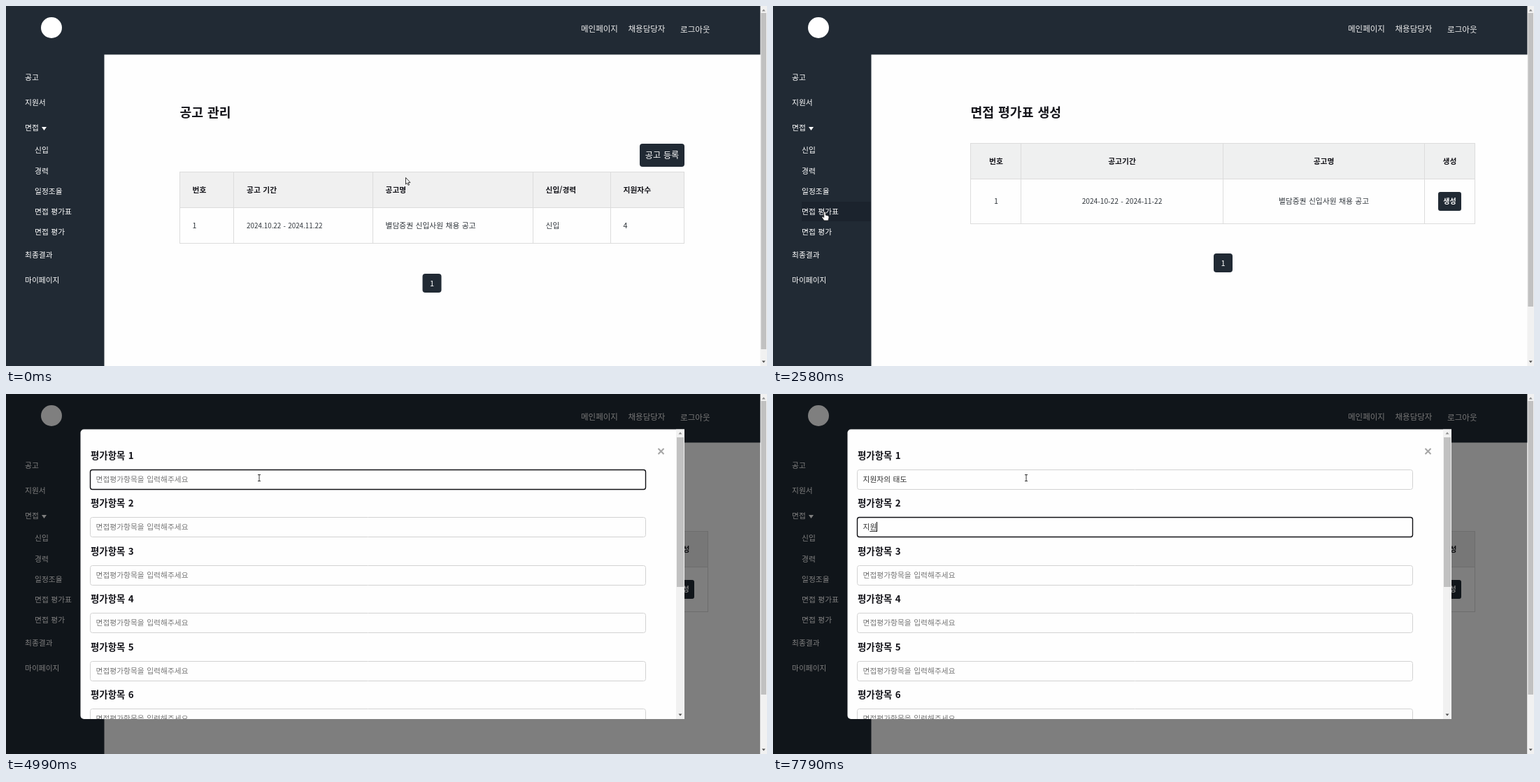
An HTML page with a canvas for the animation above (7.99 s loop, 1088 by 515 pixels).

```html
<!DOCTYPE html>
<html lang="ko">
<head>
<meta charset="utf-8">
<title>채용 관리</title>
<style>
html, body { margin: 0; width: 100%; height: 100%; overflow: hidden; }
canvas { display: block; }
</style>
</head>
<body>
<canvas width="1088" height="515"></canvas>
<script>
const ctx = document.querySelector('canvas').getContext('2d', { alpha: false });
const LOOP = 7990;
const FONT = '"Noto Sans CJK KR", "Noto Sans", sans-serif';
const NAVY = '#212a34', PAPER = '#fefefe', LINE = '#dcdcdc', INK = '#14141a', BODY = '#30363c';
const SMALL = 10.75, TITLE = 18.25;
const JOB = '별담증권 신입사원 채용 공고';
const HINT = '면접평가항목을 입력해주세요';

// Stepped tracks: each entry holds until the next one starts.
const POINTER = [
  [0, 571, 245, 'arrow'], [370, 430, 256, 'arrow'], [570, 150, 284, 'arrow'],
  [770, 70, 294, 'hand'], [2380, 74, 294, 'hand'], [2790, 92, 295, 'hand'],
  [2990, 128, 297, 'hand'], [3180, 640, 290, 'arrow'], [3390, 963, 279, 'hand'],
  [3590, 962, 278, 'arrow'], [3790, 900, 266, 'arrow'], [3990, 620, 228, 'arrow'],
  [4190, 400, 190, 'beam'], [4390, 362, 120, 'beam']
];
// time, focused field, its text, composing last letter
const TYPING = [
  [0, -1, '', false], [4590, 0, '', false],
  [5390, 0, '지', true], [5590, 0, '지우', true], [5790, 0, '지원', true],
  [5990, 0, '지원자', true], [6190, 0, '지원자의', true], [6390, 0, '지원자의 ', false],
  [6590, 0, '지원자의 태', true], [6790, 0, '지원자의 태도', true],
  [6990, 1, '', false], [7190, 1, 'ㅈ', true], [7390, 1, '지', true],
  [7590, 1, '지우', true], [7790, 1, '지원', true]
];
const at = (track, t) => track.findLast(k => k[0] <= t);

function rect(x, y, w, h, fill) {
  ctx.fillStyle = fill;
  ctx.fillRect(x, y, w, h);
}

function box(x, y, w, h, r, fill, stroke, width = 1) {
  ctx.beginPath();
  ctx.roundRect(x, y, w, h, r);
  ctx.fillStyle = fill;
  ctx.fill();
  if (!stroke) return;
  ctx.strokeStyle = stroke;
  ctx.lineWidth = width;
  ctx.stroke();
}

// Text centred vertically on y; returns its width.
function text(s, x, y, size, color, bold, align = 'left') {
  ctx.font = `${bold ? 700 : 400} ${size}px ${FONT}`;
  ctx.wordSpacing = size * 0.1 + 'px';
  ctx.textAlign = align;
  ctx.fillStyle = color;
  ctx.fillText(s, x, y + size * 0.37);
  return ctx.measureText(s).width;
}

function triangle(x, y, w, h, color) {
  ctx.fillStyle = color;
  ctx.beginPath();
  ctx.moveTo(x - w / 2, y - h / 2);
  ctx.lineTo(x + w / 2, y - h / 2);
  ctx.lineTo(x, y + h / 2);
  ctx.fill();
}

function scrollbar(x, y, w, h, top, bottom) {
  rect(x, y, w, h, '#f1f1f1');
  rect(x + 1, top, w - 2, bottom - top, '#c1c1c1');
  triangle(x + w / 2, y + 6, 5, -3, '#8a8a8a');
  triangle(x + w / 2, y + h - 6, 5, 3, '#505050');
}

function table(cols, rows, head) {
  const [x, right] = [cols[0], cols.at(-1)], [y, mid, bottom] = rows;
  rect(x, y, right - x, mid - y, head);
  cols.forEach(c => rect(c, y, 1, bottom - y + 1, LINE));
  rows.forEach(r => rect(x, r, right - x + 1, 1, LINE));
}

function pager(x, y) {
  box(x, y, 27, 27, 4, NAVY);
  text('1', x + 13.5, y + 13.5, 11, '#fff', false, 'center');
}

function frame(hover) {
  rect(0, 0, 1088, 515, PAPER);
  rect(0, 0, 1088, 69.5, NAVY);
  rect(0, 69, 140.5, 446, NAVY);
  ctx.fillStyle = '#fff';
  ctx.beginPath();
  ctx.arc(65, 31, 15, 0, 7);
  ctx.fill();
  text('메인페이지', 822, 33, 11.5, '#eee');
  text('채용담당자', 889.5, 33, 11.5, '#eee');
  text('로그아웃', 964, 34, 11.6, '#eee');
  if (hover) rect(41, 280, 99, 28, '#1b232d');
  [['공고', 102], ['지원서', 138], ['면접', 174], ['최종결과', 356], ['마이페이지', 392]]
    .forEach(([s, y]) => text(s, 27, y, SMALL, '#fff'));
  ['신입', '경력', '일정조율', '면접 평가표', '면접 평가']
    .forEach((s, i) => text(s, 41, 206.5 + 29.2 * i, SMALL, '#fff'));
  triangle(54.5, 175.5, 7, 5, '#fff');
}

function jobList() {
  text('공고 관리', 248.5, 152, TITLE, INK, true);
  box(906, 197, 64, 33, 4, NAVY);
  text('공고 등록', 938, 214, 12.1, '#fff', false, 'center');
  table([248, 325, 524, 753, 864, 969], [237, 288, 339], '#f0f0f0');
  const cols = [266.5, 344, 542.5, 771.5, 882.5];
  ['번호', '공고 기간', '공고명', '신입/경력', '지원자수']
    .forEach((s, i) => text(s, cols[i], 263, SMALL, INK, true));
  ['1', '2024.10.22 - 2024.11.22', JOB, '신입', '4']
    .forEach((s, i) => text(s, cols[i], 314.5, i == 1 ? 9.9 : SMALL, BODY));
  pager(595.5, 383);
}

function sheetList(hover) {
  text('면접 평가표 생성', 282.5, 152, TITLE, INK, true);
  table([282, 354, 643, 931, 1003], [196, 247, 311], '#eff0f0');
  const cols = [319, 499, 787.5, 967.5];
  ['번호', '공고기간', '공고명', '생성']
    .forEach((s, i) => text(s, cols[i], 222, SMALL, INK, true, 'center'));
  ['1', '2024-10-22 - 2024-11-22', JOB]
    .forEach((s, i) => text(s, cols[i], 279.5, i == 1 ? 10.2 : SMALL, BODY, false, 'center'));
  box(951, 266, 33, 27, 3, hover ? '#909295' : NAVY);
  text('생성', 967.5, 279.5, 10, '#fff', true, 'center');
  pager(630, 354);
}

function field(i, t) {
  const [, focus, typed, composing] = at(TYPING, t);
  const y = Math.round(108 + 68.4 * i), mid = y + 14;
  const active = i == focus;
  const value = active ? typed : i < focus ? '지원자의 태도' : '';
  text('평가항목 ' + (i + 1), 121, y - 19.5, 13.4, INK, true);
  box(120.5, y + .5, 794, 28, 3, PAPER, active ? '#101014' : '#d2d2d2', active ? 1.4 : 1);
  const w = text(value || HINT, 128.5, mid, SMALL, value ? '#303030' : '#777');
  if (!active) return;
  if (composing) {
    const last = ctx.measureText(value.at(-1)).width;
    rect(128.5 + w - last, mid + 6, last, 1, '#303030');
  }
  if (value || t < 4990 || i) rect(Math.round(128 + (value ? w : 0)), mid - 7, 1, 14, '#000');
}

function modal(t) {
  rect(0, 0, 1078.4, 515, 'rgba(0,0,0,.5)');
  ctx.save();
  ctx.beginPath();
  ctx.roundRect(106.5, 50.5, 863.5, 414.5, [5, 0, 0, 5]);
  ctx.clip();
  rect(106, 50, 864, 415, PAPER);
  for (let i = 0; i < 6; i++) field(i, t);
  scrollbar(958, 50, 12, 415, 62, 276);
  ctx.restore();
  ctx.strokeStyle = '#a5a5a5';
  ctx.lineWidth = 2;
  ctx.stroke(new Path2D('M932.5 78l8 8m0-8l-8 8'));
}

const SHAPES = {
  arrow: new Path2D('M.5 .5V10L2.6 8.1L4.1 11.4L5.5 10.8L4.1 7.6H7Z'),
  hand: new Path2D('M-1.3 1Q0-.9 1.3 1V5L5 6Q6.4 6.4 6 9L5 13H-1L-4 8.6Q-4 7-2.5 7.4L-1.3 8.5Z'),
  beam: new Path2D('M-2-4.5H2M0-4.5V4.5M-2 4.5H2')
};

function pointer([, x, y, kind]) {
  ctx.save();
  ctx.translate(x, y);
  ctx.lineWidth = .9;
  ctx.strokeStyle = '#222';
  ctx.fillStyle = '#fff';
  if (kind != 'beam') ctx.fill(SHAPES[kind]);
  ctx.stroke(SHAPES[kind]);
  ctx.restore();
}

function draw(t) {
  const second = t >= 2180;
  frame(t >= 770 && t < 3180);
  if (second) sheetList(t >= 3390 && t < 3790);
  else jobList();
  if (t >= 3590) modal(t);
  scrollbar(1078.4, 0, 9.6, 515, 10, second ? 430 : 491);
  if (t >= 1980 && t < 2180) {
    ctx.fillStyle = 'rgba(205,195,0,.65)';
    ctx.beginPath();
    ctx.arc(70, 294, 8.2, 0, 7);
    ctx.fill();
  }
  pointer(at(POINTER, t));
}

let start;
function tick(now) {
  start ??= now;
  draw((now - start) % LOOP);
  requestAnimationFrame(tick);
}
requestAnimationFrame(tick);
</script>
</body>
</html>
```
